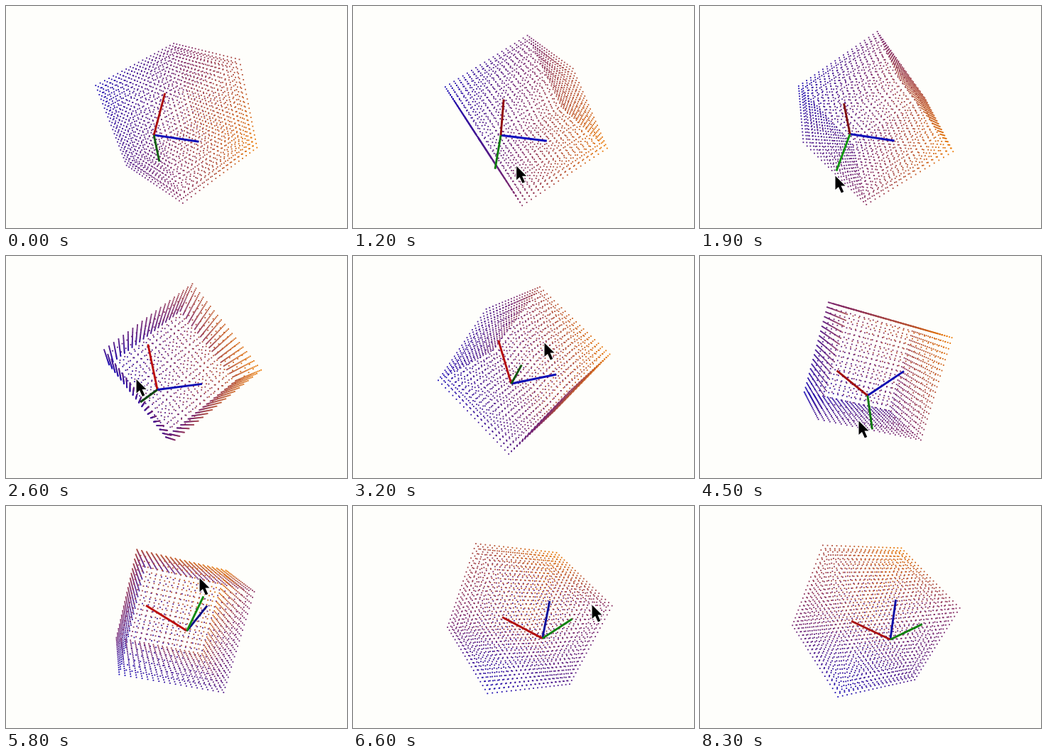
Recreate the animation shown at these times as an HTML page with a canvas. Size 480x313 px, loop 8.4 s.

```html
<!DOCTYPE html>
<html lang="en">
<head>
<meta charset="utf-8">
<title>Rotating point cube</title>
<style>
  html, body { margin: 0; width: 100%; height: 100%; overflow: hidden; background: #fefefb; }
  canvas { display: block; width: 100vw; height: 100vh; }
</style>
</head>
<body>
<canvas id="stage" width="480" height="313"></canvas>
<script>
const ctx = document.getElementById('stage').getContext('2d');
const LOOP = 8400, STEP = 100, PAPER = '#fefefb';
const CX = 242, CY = 156.7, HALF = 70.5, FOCAL = 640;
const GRID = 20, DOT = 1.8;
const PX_PER_RAD = 480 / Math.PI;

// Two cube edges as seen at rest: right, up, towards the viewer.
const EDGE_A = [.246, -.836, -.494], EDGE_B = [-.76, -.483, .436];

// Each drag turns the cube by a rotation vector in view space.
const GRAB = [272, 205];
const DRAGS = [
  { from: 300,  to: 1900, turn: [.346, -.533, .012],  hand: [190, 239] },
  { from: 1900, to: 3200, turn: [-1.249, .44, .331],  hand: [269, 122] },
  { from: 3200, to: 4500, turn: [1.139, -.182, .391], hand: [223, 232] },
  { from: 4500, to: 5800, turn: [-1.37, .233, .404],  hand: [272, 101] },
  { from: 5800, to: 6600, turn: [.387, .372, .04],    hand: [336, 139] },
  { from: 6600, to: 7800, turn: [.09, .05, .008],     hand: [343, 146] },
  { from: 8000, to: 8300, turn: [.018, .012, 0],      hand: [343, 146] }
];
const CURSOR_SHOWN = [800, 7800];

// Axis triad in cube space, placed off the cube's centre.
const ORIGIN = [.1, .595, .072], AXIS_LEN = .93;
const RED = [-.871, -.413, -.242], BLUE = [.486, -.762, -.429];

const dot = (a, b) => a[0] * b[0] + a[1] * b[1] + a[2] * b[2];
const mix = (a, b, u) => a.map((v, i) => v + (b[i] - v) * u);
const cross = (a, b) => [
  a[1] * b[2] - a[2] * b[1],
  a[2] * b[0] - a[0] * b[2],
  a[0] * b[1] - a[1] * b[0]
];

const AXES = [
  { dir: RED,              rgb: [1, 0, 0] },
  { dir: cross(BLUE, RED), rgb: [0, 1, 0] },
  { dir: BLUE,             rgb: [0, 0, 1] }
];
const RAMP = [[22, 8, 180], [128, 42, 108], [236, 122, 0]];

function rotate(v, turn) {
  const angle = Math.hypot(...turn);
  if (!angle) return v;
  const k = turn.map(c => c / angle), side = cross(k, v);
  const c = Math.cos(angle), s = Math.sin(angle), along = dot(k, v) * (1 - c);
  return v.map((n, i) => n * c + side[i] * s + k[i] * along);
}

function rampColor(u) {
  const c = u < .5 ? mix(RAMP[0], RAMP[1], u * 2) : mix(RAMP[1], RAMP[2], u * 2 - 1);
  return `rgb(${c.map(Math.round)})`;
}

// Grid points on the cube's surface, coloured by height along the blue axis.
function makePoints() {
  const list = [], last = GRID - 1;
  const reach = BLUE.reduce((s, c) => s + Math.abs(c), 0);
  for (let i = 0; i < GRID; i++)
    for (let j = 0; j < GRID; j++)
      for (let k = 0; k < GRID; k++) {
        if (![i, j, k].some(n => n === 0 || n === last)) continue;
        const pos = [i, j, k].map(n => n / last * 2 - 1);
        list.push({ pos, color: rampColor((dot(pos, BLUE) / reach + 1) / 2) });
      }
  return list;
}
const points = makePoints();

// The hand swings along half an ellipse; the swept area becomes roll.
function stateAt(t) {
  let edges = [EDGE_A, EDGE_B], hand = GRAB;
  for (const drag of DRAGS) {
    if (t <= drag.from) break;
    const phi = Math.PI * Math.min(1, (t - drag.from) / (drag.to - drag.from));
    const [pitch, yaw, roll] = drag.turn;
    const ease = (1 - Math.cos(phi)) / 2;
    const swing = 4 / Math.PI * roll / pitch * Math.sin(phi);
    const turn = [pitch * ease, yaw * ease + swing, roll * (phi - Math.sin(phi)) / Math.PI];
    edges = edges.map(e => rotate(e, turn));
    hand = mix(hand, drag.hand, ease);
    hand[0] += swing * PX_PER_RAD;
  }
  return { edges: [...edges, cross(...edges)], hand };
}

const toView = (p, edges) =>
  [0, 1, 2].map(i => p[0] * edges[0][i] + p[1] * edges[1][i] + p[2] * edges[2][i]);

function project(p, edges) {
  const [x, y, z] = toView(p, edges);
  const s = HALF * FOCAL / (FOCAL - HALF * z);
  return [CX + s * x, CY - s * y];
}

function drawPoints(edges) {
  for (const { pos, color } of points) {
    const [x, y] = project(pos, edges);
    ctx.fillStyle = color;
    ctx.fillRect(x - DOT / 2, y - DOT / 2, DOT, DOT);
  }
}

function drawAxes(edges) {
  const start = project(ORIGIN, edges);
  const depth = axis => toView(axis.dir, edges)[2];
  const sorted = [...AXES].sort((a, b) => depth(a) - depth(b));
  ctx.lineWidth = 2.9;
  for (const axis of sorted) {
    const tip = project(ORIGIN.map((c, i) => c + AXIS_LEN * axis.dir[i]), edges);
    const light = 190 * Math.sqrt(Math.max(0, 1 - depth(axis) ** 2));
    ctx.strokeStyle = `rgb(${axis.rgb.map(c => Math.round(c ? light : 14))})`;
    ctx.beginPath();
    ctx.moveTo(...start);
    ctx.lineTo(...tip);
    ctx.stroke();
  }
}

const arrow = new Path2D('M0 0V19.5L4.5 15.4L8.4 24L11.8 22.4L8 14H14Z');

function drawCursor(hand) {
  ctx.save();
  ctx.translate(hand[0] + .5, hand[1] + .5);
  ctx.lineWidth = 2;
  ctx.strokeStyle = '#fff';
  ctx.stroke(arrow);
  ctx.fillStyle = '#000';
  ctx.fill(arrow);
  ctx.restore();
}

function draw(now) {
  const t = Math.floor((now % LOOP) / STEP) * STEP;
  const { edges, hand } = stateAt(t);
  ctx.fillStyle = PAPER;
  ctx.fillRect(0, 0, 480, 313);
  drawPoints(edges);
  drawAxes(edges);
  if (t >= CURSOR_SHOWN[0] && t < CURSOR_SHOWN[1]) drawCursor(hand);
}

let begin;
function tick(now) {
  begin ??= now;
  draw(Math.max(0, now - begin));
  requestAnimationFrame(tick);
}
draw(0);
requestAnimationFrame(tick);
</script>
</body>
</html>
```
